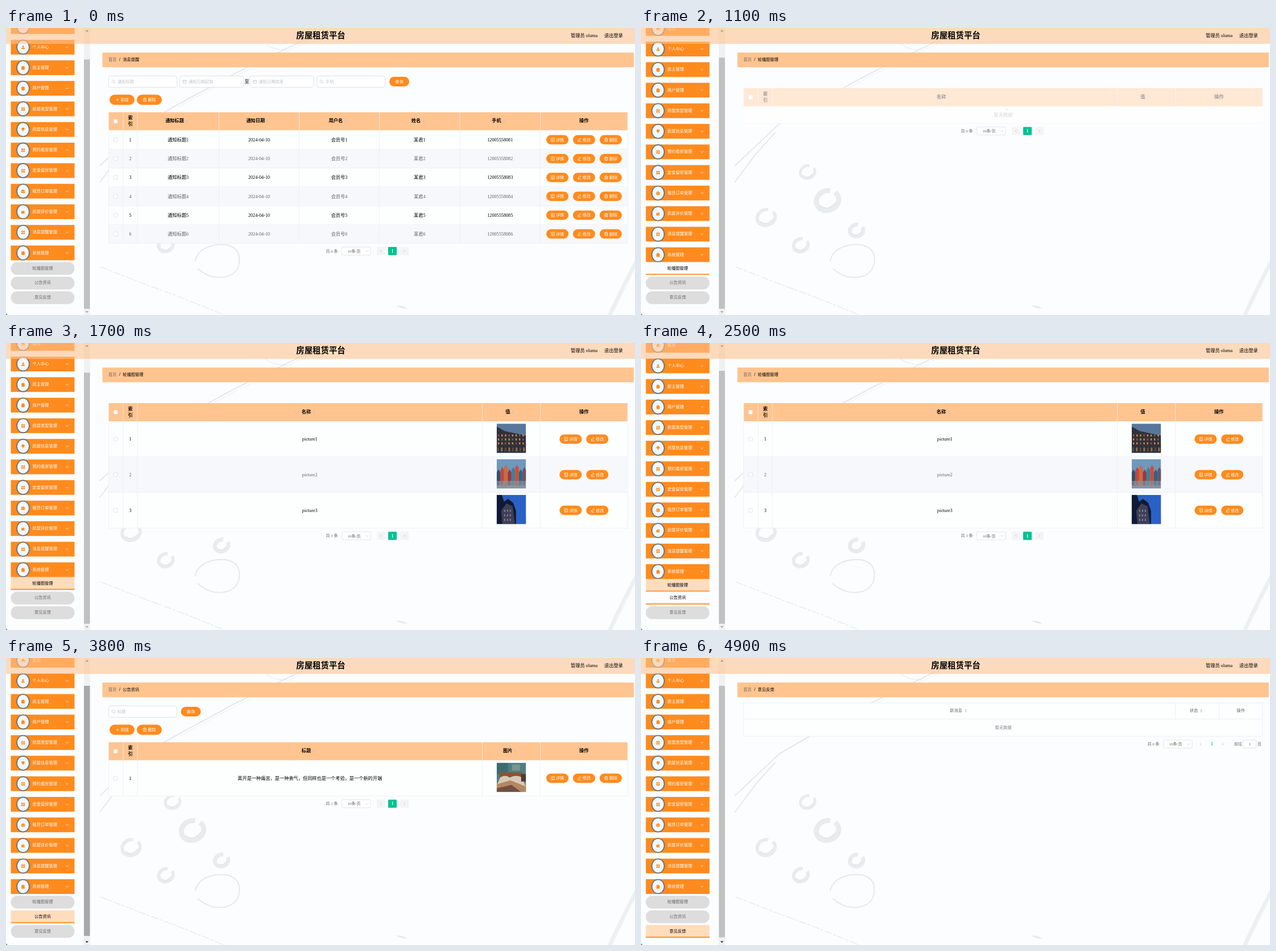
Animation, 1106 px wide and 506 px high, one loop 5.9 s. Source, as an HTML page:

```html
<!DOCTYPE html>
<html>
<head>
<meta charset="utf-8">
<style>
html, body { margin: 0; width: 100%; height: 100%; overflow: hidden; background: #fbfdff; }
svg { display: block; width: 100vw; height: 100vh; }
text { font-family: "Liberation Serif", "Noto Sans CJK SC", "Noto Sans CJK", sans-serif; white-space: pre; }
</style>
</head>
<body>
<svg viewBox="0 0 1106 506"><g id="back"></g><g id="live"></g></svg>
<script>
const LOOP = 5900, ORANGE = '#ff8b1e', PEACH = '#ffc48f', LINE = '#ebeef5', GREEN = '#00c292';
const SWAP = [800, 2700, 4500];
const MENU = ['首页', '个人中心', '房主管理', '用户管理', '房屋类型管理', '房屋信息管理', '预约看房管理',
  '定金留房管理', '租赁订单管理', '房屋评价管理', '消息提醒管理', '系统管理'];
const MENU_ICONS = ['home', 'user', 'clip', 'clip', 'grid', 'pin', 'grid', 'grid', 'bag', 'wallet', 'grid', 'clip'];
const SOLID = {
  home: 'M0-3.3L3.5 0H2.6V3H.8V1H-.8V3H-2.6V0H-3.5Z',
  user: 'M-1.6-1.5a1.6 1.6 0 1 1 3.2 0a1.6 1.6 0 1 1-3.2 0M-3.2 3a3.2 2.6 0 0 1 6.4 0Z',
  clip: 'M-2.8-2.6H-1.2V-3.3H1.2V-2.6H2.8V3.4H-2.8Z',
  grid: 'M-3-3H-.4V-.4H-3ZM.4-3H3V-.4H.4ZM-3 .4H-.4V3H-3ZM.4 .4H3V3H.4Z',
  pin: 'M0 3.6C-1-.1-2.7.4-2.7-1.2a2.7 2.4 0 0 1 5.4 0C2.7.4 1-.1 0 3.6Z',
  bag: 'M-3.3-1.7H-1.5V-2.9H1.5V-1.7H3.3V.2H-3.3ZM-3.3.8H3.3V2.9H-3.3Z',
  wallet: 'M-3-1.3H0V-3L2-1.3H3V0H1.5V1.4H3V3H-3Z'
};
const THIN = {
  plus: 'M-3 0H3M0-3V3',
  doc: 'M-2.7-3H2.7V3H-2.7ZM-1.3-1.2H1.3M-1.3.4H0M-1.3 1.8H1.3',
  pen: 'M-2.4 1.8L-2-.2L1.2-3L2.6-1.6L-.5 1.4ZM-3 3.2H3',
  bin: 'M-3.2-2H3.2M-1-2V-3.2H1V-2M-2.3-2V3H2.3V-2M-.7-.5V1.7M.7-.5V1.7',
  lens: 'M2.3-.3a2.5 2.5 0 1 1-5 0a2.5 2.5 0 1 1 5 0M1.5 1.6L3.2 3.2',
  date: 'M-3-2.3H3V2.8H-3ZM-3-.6H3M-1.5-3.2V-1.7M1.5-3.2V-1.7',
  down: 'M-2.3-1.1L0 1.2L2.3-1.1',
  left: 'M1-2.2L-1.2 0L1 2.2',
  right: 'M-1-2.2L1.2 0L-1 2.2'
};

const clamp = x => Math.max(0, Math.min(1, x));
const ease = x => { x = clamp(x); return 1 - (1 - x) ** 2.2 * (1 + .6 * x); };
const range = n => [...Array(n).keys()];
const R = (x, y, w, h, fill, extra = '') => `<rect x="${x}" y="${y}" width="${w}" height="${h}" fill="${fill}" ${extra}/>`;
const P = (d, color, width = .7, extra = '') => `<path d="${d}" fill="none" stroke="${color}" stroke-width="${width}" ${extra}/>`;
const F = (d, fill) => `<path d="${d}" fill="${fill}"/>`;
const at = (x, y, s) => `<g transform="translate(${x} ${y})">${s}</g>`;
const thin = (name, x, y, color) => at(x, y, P(THIN[name], color));
const T = (x, cy, s, size = 8.2, fill = '#000', anchor = 'middle', bold = 0) =>
  `<text x="${x}" y="${cy + size * .36}" font-size="${size}" fill="${fill}" text-anchor="${anchor}" font-weight="${bold ? 700 : 400}">${s}</text>`;

// Submenu looks: margin, radius, background r g b, text grey, underline
const LOOK = {
  pill: [3.25, 11.2, 221, 221, 221, 105, 0],
  over: [0, 0, 252, 252, 252, 0, 1],
  on: [0, 0, 255, 220, 188, 0, 1]
};
const SUB = [
  ['轮播图管理', [170, 'over'], [1280, 'on'], [2680, 'pill']],
  ['公告资讯', [2170, 'over'], [2790, 'on'], [4480, 'pill']],
  ['意见反馈', [4080, 'over'], [4610, 'on']]
];
function look(keys, t) {
  let v = LOOK.pill;
  for (const [start, name] of keys) {
    const k = ease((t - start) / 280);
    v = v.map((a, i) => a + (LOOK[name][i] - a) * k);
  }
  return v;
}

function sidebar(t) {
  const looks = SUB.map(([, ...keys]) => look(keys, t)), m = looks.map(v => v[0]);
  const gaps = [m[0], Math.max(m[0], m[1]), Math.max(m[1], m[2]), m[2]];
  const used = 67.5 + gaps.reduce((a, b) => a + b);
  const base = t < 2650 ? 490 - used : 416;
  const over = Math.max(0, base + used - 490);
  let s = '';
  MENU.forEach((name, i) => {
    const y = base - 26 - 36.27 * (11 - i), c = y + 13;
    s += R(8.5, y, 112, 26, ORANGE) +
      `<ellipse cx="30" cy="${c}" rx="11" ry="12.4" fill="#f0f8ff" stroke="#6d7478" stroke-width="1.8"/>` +
      at(30, c + .3, F(SOLID[MENU_ICONS[i]], ORANGE)) + T(46.5, c - .6, name, 7.25, '#fff', 'start');
    if (i) s += thin('down', 107.5, c, '#fff');
  });
  let y = base;
  looks.forEach(([, r, red, g, b, ink, line], i) => {
    y += gaps[i];
    s += R(8.5, y, 112, 22.5, `rgb(${red},${g},${b})`, `rx="${r}"`) +
      R(8.5, y + 20.7, 112, 1.8, ORANGE, `opacity="${line}"`) +
      T(64.5, y + 10.3, SUB[i][0], 7.25, `rgb(${ink},${ink},${ink})`);
    y += 22.5;
  });
  const top = 465 - base, grip = t >= 3800 && t < 3900 ? '#a8a8a8' : '#c1c1c1';
  return s + R(137, 0, 11, 506, '#f1f1f1') + R(137, top, 10.5, 495 - over * .77 - top, grip) +
    F('M139.5 6.3L142.3 3.2L145.1 6.3Z', '#505050') +
    F('M139.5 499.2L142.3 502.3L145.1 499.2Z', over > 1 ? '#333' : '#a3a3a3');
}

function button(x, cy, w, h, label, icon) {
  const start = x + (w - 22) / 2;
  return R(x, cy - h / 2, w, h, ORANGE, `rx="${h / 2}"`) + (icon
    ? thin(icon, start + 3, cy, '#fff') + T(start + 8.4, cy, label, 7.2, '#fff', 'start')
    : T(x + w / 2, cy, label, 7.2, '#fff'));
}
const field = (x, w, icon, hint) => R(x, 84.5, w, 20, '#fff', 'rx="3.5" stroke="#dcdfe6" stroke-width=".9"') +
  thin(icon, x + 8.5, 94.5, '#c0c4cc') + T(x + 15.5, 94.5, hint, 7.25, '#c0c4cc', 'start');
const tools = () => button(182, 126.5, 44, 18, '新增', 'plus') + button(230, 126.5, 44, 18, '删除', 'bin');
const box = cy => R(189.3, cy - 3.4, 6.8, 6.8, '#fff', 'rx="1" stroke="#dcdfe6" stroke-width=".8"');
const carets = (x, y) => F(`M${x - 2} ${y - .8}L${x} ${y - 3}L${x + 2} ${y - .8}ZM${x - 2} ${y + .8}L${x} ${y + 3}L${x + 2} ${y + .8}Z`, '#c0c4cc');

const ACTIONS = [['详情', 'doc'], ['修改', 'pen'], ['删除', 'bin']];
const actions = (x, cy, n) => ACTIONS.slice(0, n).map(([s, icon], i) => button(x + 46.9 * i, cy, 39, 16.5, s, icon)).join('');

function pager(cy, total, x = 0, plain) {
  const chip = (left, fill) => plain ? '' : R(left, cy - 7.2, 15, 14.4, fill, 'rx="1"');
  return T(562.5 + x, cy - .3, `共 ${total} 条`, 7, '#606266', 'start') +
    R(590.5 + x, cy - 7, 50.5, 14, '#fff', 'rx="1.5" stroke="#dcdfe6" stroke-width=".8"') +
    T(612 + x, cy, '10条/页', 7, '#606266') + thin('down', 635 + x, cy, '#c0c4cc') +
    chip(652, '#f4f4f5') + chip(672, GREEN) + chip(693, '#f4f4f5') +
    thin('left', (plain ? 656 : 659.5) + x, cy, '#b4b8c0') + thin('right', (plain ? 695 : 700.5) + x, cy, '#b4b8c0') +
    T((plain ? 676 : 679.5) + x, cy, '1', 7.2, plain ? GREEN : '#fff', 'middle', 1);
}

function table(top, cols, heads, count, rowH, cells) {
  const head = top + 32, empty = !count, end = head + (empty ? 30 : count * rowH);
  const mid = i => (cols[i] + cols[i + 1]) / 2;
  let s = R(180.5, top, 912.5, 32, PEACH) + R(180.5, head, 912.5, end - head, '#fdfefe') + box(top + 16) +
    T(218.5, top + 10, '索', 8.2, '#000', 'middle', 1) + T(218.5, top + 21, '引', 8.2, '#000', 'middle', 1);
  heads.forEach((h, i) => {
    const x = mid(i + 2), last = i == heads.length - 1;
    s += T(last ? x : x - 6.2, top + 15, h, 8.2, '#000', 'middle', 1);
    if (!last) s += carets(x - 1 + h.length * 4.1, top + 15.5);
  });
  for (let i = 0; i < count; i++) {
    const y = head + i * rowH, cy = y + rowH / 2, ink = i % 2 ? '#606266' : '#000';
    if (i % 2) s += R(180.5, y, 912.5, rowH, '#f6f8fb');
    s += box(cy) + T(218.5, cy, i + 1, 8.2, ink) + cells(i, cy, ink, mid, y) + R(180.5, y + rowH - .5, 912.5, .8, LINE);
  }
  if (empty) s += T(637, head + 15, '暂无数据', 8.2, '#909399') + R(180.5, end - .5, 912.5, .8, LINE);
  for (const x of cols) s += R(x - .4, top, .8, (empty ? head : end) - top, LINE);
  return s + pager(end + 13.6, count);
}

function veil(t, top, begin, stop) {
  const a = .9 * ease((t - begin) / 300) * (1 - ease((t - stop) / 300));
  if (a < .005) return '';
  const u = (t - begin) / 1000, arc = 2 + 50 * clamp(u - .15);
  return `<g opacity="${a}">` + R(180.5, top, 912.5, 62, '#fff') + '</g>' +
    `<circle cx="637" cy="${top + 46}" r="10.5" fill="none" stroke="#8a8f96" stroke-dasharray="${arc} 99" opacity="${a}" transform="rotate(${-85 + 180 * u} 637 ${top + 46})"/>`;
}

function photo(kind, x, y) {
  const [sky, low] = [['#58779b', '#27303f'], ['#6f98bd', '#8792a0'], ['#2453ac', '#142f6b'], ['#4f7f80', '#a3795b']][kind];
  let s = R(0, 0, 51.5, 51.5, sky) + R(0, 36, 51.5, 15.5, low);
  if (kind == 0) {
    s += F('M0 5L14 13L28 16L51.5 21V41H0Z', '#33303a');
    range(24).forEach(i => s += R(2 + i % 8 * 6.2, 19 + (i >> 3) * 7, 2.4, 3.6, i % 3 ? '#c98a45' : '#76604d'));
    range(8).forEach(i => s += R(1 + i * 6.5, 42, 3, 7, i % 2 ? '#a26a35' : '#594c47'));
  } else if (kind == 1) {
    const hues = ['#34506b', '#bb4a3c', '#d2693a', '#983848', '#3b829c', '#d84b32', '#28668c', '#6d5361'];
    hues.forEach((c, i) => s += F(`M${i * 6.5} 38V${23 - i % 3 * 4}l3.2-5l3.2 5V38Z`, c));
    hues.forEach((c, i) => s += R(i * 6.5, 38, 5, 8, c, 'opacity=".4"'));
  } else if (kind == 2) {
    s += R(0, 0, 51.5, 51.5, '#2a61c6') + F('M0 0H9L13 12L20 7L29 14L34 28V51.5H0Z', '#111a35') + F('M8 28L17 15L28 20L32 51.5H10Z', '#3d3f59');
    range(9).forEach(i => s += R(13 + i % 3 * 5, 26 + (i / 3 | 0) * 8, 2, 4, '#857d86'));
  } else {
    s += R(0, 0, 20, 20, '#3e6b70') + R(27, 3, 14, 11, '#78958f') + R(5, 17, 40, 15, '#8a5432') +
      F('M6 26Q15 20 23 26Q34 20 45 26L51.5 44V51.5H0V40Z', '#d8c8b5') + F('M0 38L24 31L51.5 42V51.5H0Z', '#b58661') +
      F('M0 45L26 39L43 51.5H0Z', '#715040') + R(43, 20, 8.5, 13, '#4c3b35');
  }
  return `<svg x="${x}" y="${y}" width="51.5" height="51.5">${s}</svg>`;
}

const WIDE = [180.5, 206, 231, 837.5, 939.5, 1093];
const PAGES = [
  ['消息提醒', () => field(180.5, 120, 'lens', '通知标题') + field(305.5, 112.5, 'date', '通知日期起始') + T(423.5, 94.5, '至') +
    field(429, 112, 'date', '通知日期结束') + field(546.5, 120, 'lens', '手机') + button(674, 94.5, 35, 17, '查询') + tools() +
    table(148.5, [180.5, 206, 231, 374.5, 515.5, 656.5, 798, 939.5, 1093], ['通知标题', '通知日期', '用户名', '姓名', '手机', '操作'], 6, 33.2,
      (i, cy, ink, mid) => ['通知标题' + (i + 1), '2024-04-10', '会员号' + (i + 1), '某君' + (i + 1), 12005558081 + i]
        .map((s, c) => T(mid(c + 2), cy, s, 8.2, ink)).join('') + actions(950, cy, 3))],
  ['轮播图管理', t => table(106, WIDE, ['名称', '值', '操作'], t < 1300 ? 0 : 3, 62.8,
    (i, cy, ink, mid, y) => T(mid(2), cy, 'picture' + (i + 1), 8.2, ink) + photo(i, 862.8, y + 4.2) + actions(973.3, cy, 2)) +
    veil(t, 106, 960, 1340)],
  ['公告资讯', t => field(180.5, 120, 'lens', '标题') + button(307.5, 94.5, 35, 17, '查询') + tools() +
    table(148.5, WIDE, ['标题', '图片', '操作'], t < 2800 ? 0 : 1, 62.8,
      (i, cy, ink, mid, y) => T(mid(2), cy, '离开是一种痛苦，是一种勇气，但同样也是一个考验，是一个新的开端', 8.2, ink) +
        photo(3, 862.8, y + 4.2) + actions(950, cy, 3)) + veil(t, 148.5, 2700, 2790)],
  ['意见反馈', () => R(180.3, 79.3, 912.7, 58.7, '#fdfefe', `stroke="${LINE}" stroke-width=".9"`) +
    P('M180 107.5H1093M939.7 79V107.5M1016.5 79V107.5', LINE, .9) +
    T(554, 92.8, '新消息', 7.25, '#666') + carets(571, 93) + T(972, 92.8, '状态', 7.25, '#666') + carets(985, 93) +
    T(1054.5, 92.8, '操作', 7.25, '#666') + T(637, 122.3, '暂无数据', 7.25, '#808388') + pager(151.8, 0, 328, 1) +
    T(1043, 151.8, '前往', 7, '#606266', 'start') + R(1058.7, 144.8, 23, 14, '#fff', 'rx="1.5" stroke="#dcdfe6" stroke-width=".8"') +
    T(1070.3, 151.8, '1', 7, '#606266') + T(1087.5, 151.8, '页', 7, '#606266')]
];

function backdrop() {
  const tone = '#e5e9ed';
  const rings = [[293, 254, 13, 5], [328, 304, 20, 9], [220, 334, 16, 6], [379, 357, 12, 7], [281, 383, 13, 6]];
  return P('M535 16L405 79L300 136L243 169', tone, 2.2) + P('M533 22L405 84L303 139', '#eef1f4', 1) +
    P('M456 28Q472 40 494 38', tone, 1) + P('M243 169L204 206L165 243M236 184L202 222L165 272', tone, 2) +
    rings.map(([x, y, r, w]) => `<ellipse cx="${x}" cy="${y}" rx="${r}" ry="${r * .86}" fill="none" stroke="#e9ecef" stroke-width="${w}" stroke-dasharray="${r * 4.9} 9" transform="rotate(-20 ${x} ${y})"/>` +
      P(`M${x - r * .6} ${y + r * .45}Q${x} ${y + r} ${x + r * .7} ${y + r * .2}`, '#dde1e5', 1.2)).join('') +
    P('M333 411C334 398 347 386 366 383C390 379 407 386 410 402C413 423 402 436 384 439C368 442 352 437 337 424', tone, 2) +
    P('M166 421L235 448L310 476L384 506', tone, 1.3, 'stroke-dasharray="14 2 5 3"') +
    P('M1110 407L1086 454L1061 506', '#edf0f2', 6) + P('M1106 422L1065 506', tone, .8) +
    F('M686 490Q696 488 706 495L697 494Z', tone) + F('M0 503L3 506H0Z', '#888');
}

function scene(t) {
  const [name, body] = PAGES[SWAP.filter(s => t >= s).length];
  return sidebar(t) + R(0, 0, 1106, 28, PEACH, 'opacity=".6"') +
    T(553.5, 13, '房屋租赁平台', 14.4, '#000', 'middle', 1) +
    T(993, 12.6, '管理员 oluma', 8.2, '#000', 'start') + T(1052, 12.6, '退出登录', 8.2, '#000', 'start') +
    R(169.5, 43.3, 934.5, 25.9, PEACH) + T(180, 55.5, '首页', 7.25, '#666', 'start') +
    T(200, 55.5, '/', 7.5, '#000', 'middle', 1) + T(205.3, 55.5, name, 7.25, '#000', 'start') + body(t);
}

const live = document.getElementById('live');
let shown = '';
document.getElementById('back').innerHTML = backdrop();
const begin = performance.now();
function frame() {
  const s = scene((performance.now() - begin) % LOOP);
  if (s !== shown) live.innerHTML = shown = s;
  requestAnimationFrame(frame);
}
frame();
</script>
</body>
</html>
```
